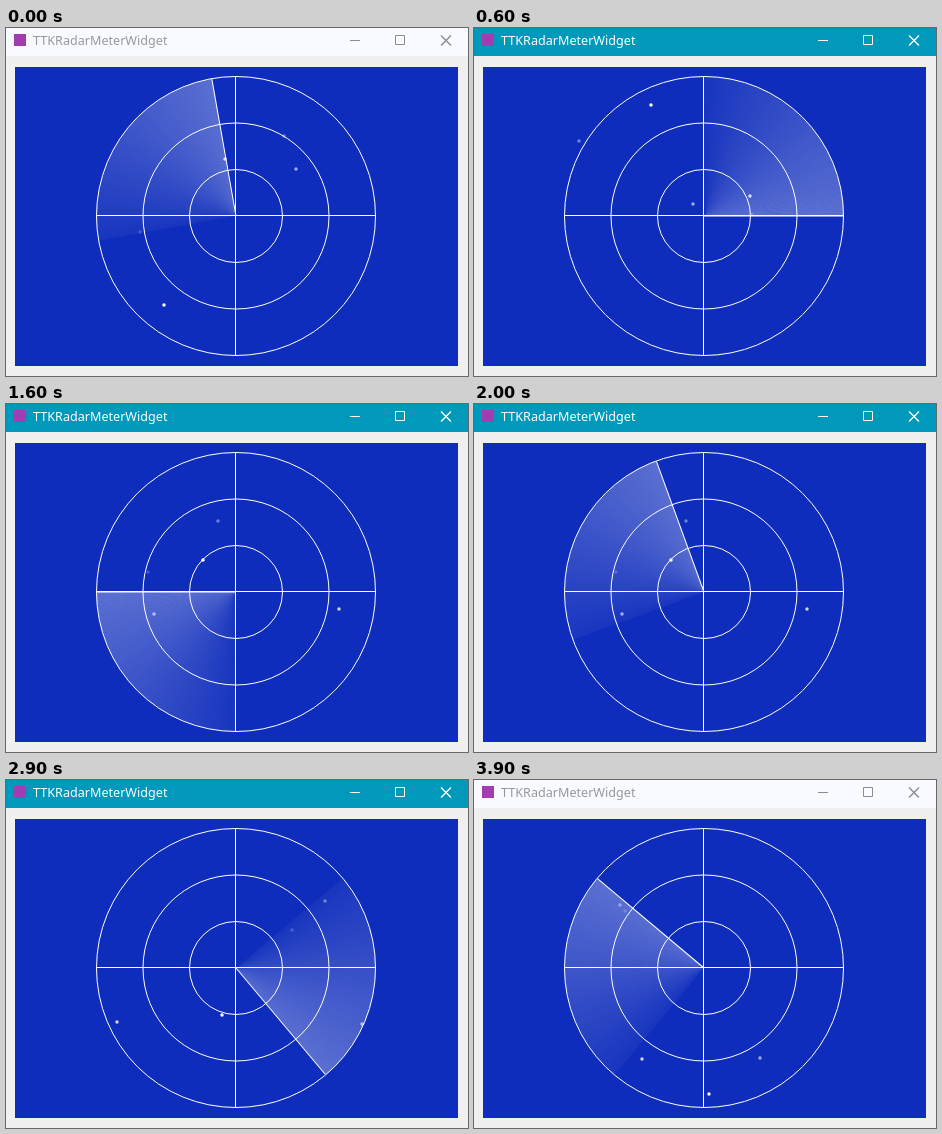
Animation, 462 px wide and 348 px high, one loop 4 s. Source, as an HTML page:

```html
<!DOCTYPE html>
<html lang="en">
<head>
<meta charset="utf-8">
<title>Radar meter</title>
<style>
  html, body { margin: 0; width: 100%; height: 100%; overflow: hidden; background: #f0f0f0; }
  svg { display: block; }
  text { font: 12.6px "Noto Sans", "Open Sans", sans-serif; }
</style>
</head>
<body>
<svg width="462" height="348" viewBox="0 0 462 348">
  <rect width="462" height="348" fill="#f0f0f0"/>
  <rect id="bar" width="462" height="28"/>
  <rect x="8" y="6" width="12" height="12" fill="#a33cb0"/>
  <text id="title" x="27" y="17">TTKRadarMeterWidget</text>
  <g id="buttons" fill="none">
    <path d="M344 12.5h10M389.5 7.5h9v9h-9z"/>
    <path d="M435 7.5l10 10M445 7.5l-10 10" stroke-width="1.4"/>
  </g>
  <rect x="9" y="39" width="443" height="299" fill="#0f2dbc"/>
  <g transform="translate(230 188)">
    <g id="blips" fill="#fff"></g>
    <g id="sweep" fill="#fff"></g>
    <g id="rings" fill="none" stroke="#fff"></g>
    <path d="M-140 -.5H140M-.5 -140V140" stroke="#fff"/>
    <path id="hand" d="M0 0V-139" stroke="#fff"/>
  </g>
</svg>
<script>
const LOOP = 4000, FRAME = 100;
const RADIUS = 139.5, SPAN = 90, STEP = 10;
const TICKS_PER_MS = .0175, TICKS_PER_SCAN = 20, BLIPS = 5;
const $ = id => document.getElementById(id);
const list = (count, make) => Array.from({ length: count }, (_, i) => make(i)).join("");

function rim(deg) {
  const a = deg * Math.PI / 180;
  return `${(RADIUS * Math.sin(a)).toFixed(2)} ${(-RADIUS * Math.cos(a)).toFixed(2)}`;
}

$("rings").innerHTML = list(3, i => `<circle r="${RADIUS * (i + 1) / 3}"/>`);

// One-degree wedges that fade away behind the hand
$("sweep").innerHTML = list(SPAN, i => {
  const alpha = .32 - .28 * i / SPAN;
  return `<path d="M0 0L${rim(-i - 1)}A${RADIUS} ${RADIUS} 0 0 1 ${rim(-i)}Z" opacity="${alpha.toFixed(3)}"/>`;
});

function seeded(seed) {
  let s = seed;
  return () => {
    s = (s * 1664525 + 1013904223) >>> 0;
    return s / 2 ** 32;
  };
}

// Every scan scatters new blips over the square around the dial
let shownScan = -1;
function showBlips(scan) {
  if (scan === shownScan) return;
  shownScan = scan;
  const random = seeded(scan * 7919 + 17);
  const spot = () => Math.round((random() * 2 - 1) * RADIUS);
  $("blips").innerHTML = list(BLIPS, i =>
    `<circle cx="${spot()}" cy="${spot()}" r="1.75" opacity="${1 - .2 * i}"/>`);
}

function render(ms) {
  const t = Math.floor(ms % LOOP / FRAME) * FRAME;
  const tick = Math.floor(t * TICKS_PER_MS + .35);
  const turn = `rotate(${(tick - 1) * STEP})`;
  $("sweep").setAttribute("transform", turn);
  $("hand").setAttribute("transform", turn);
  showBlips(Math.floor((tick - 2) / TICKS_PER_SCAN) + 1);

  const active = t >= 300 && t < 3800;
  $("bar").setAttribute("fill", active ? "#0099bc" : "#f8faff");
  $("title").setAttribute("fill", active ? "#fff" : "#999");
  $("buttons").setAttribute("stroke", active ? "#fff" : "#8c8c8c");
}

const start = performance.now();
function loop() {
  render(performance.now() - start);
  requestAnimationFrame(loop);
}
loop();
</script>
</body>
</html>
```
